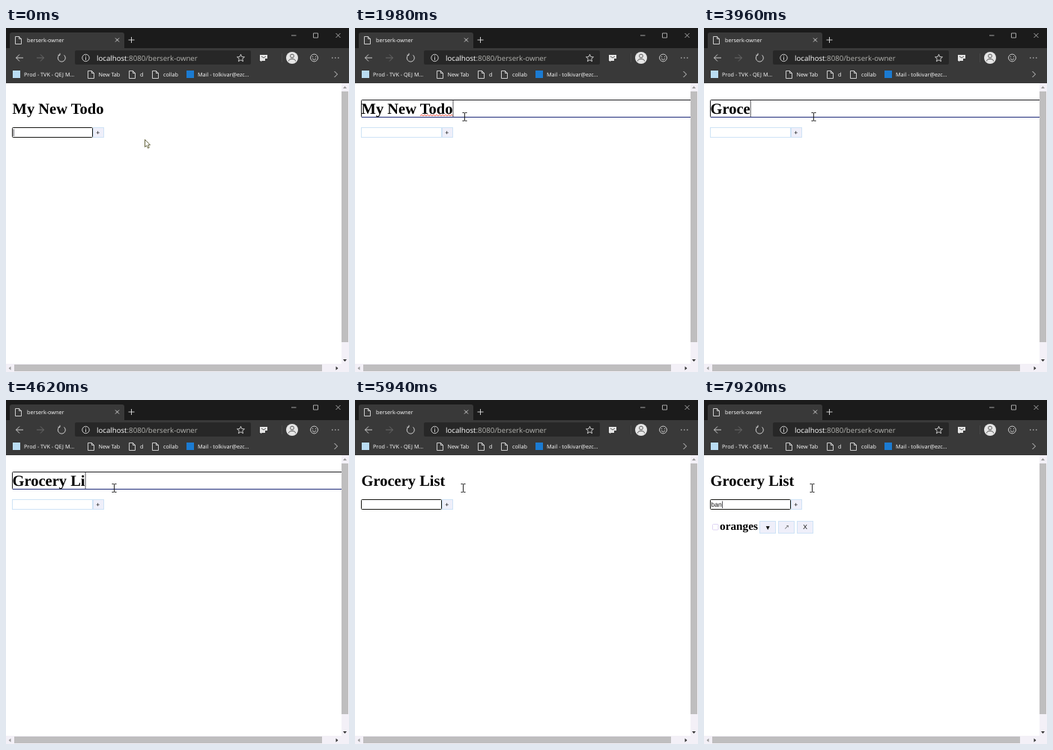
Write an HTML page that moves like this. It is 458x461 px and loops after 8000 ms.

```html
<!DOCTYPE html>
<html lang="en">
<head>
<meta charset="utf-8">
<title>Todo list</title>
<style>
  html, body { margin: 0; width: 100%; height: 100%; overflow: hidden; background: #fff; }
  svg { display: block; width: 458px; height: 461px; }
  text { white-space: pre; text-rendering: geometricPrecision; }
  .ui { font: 7.25px "Open Sans", "Noto Sans", sans-serif; fill: #fff; }
  .url { font-size: 9.68px; }
  .serif { font: bold 20.5px "Liberation Serif", "Times New Roman", serif; fill: #000; }
  .item { font-size: 15.3px; }
  .form { font: 8.53px "Liberation Sans", Arial, "DejaVu Sans", sans-serif; fill: #111; }
  .mid { text-anchor: middle; }
  .line { fill: none; stroke: #dcdcdc; stroke-width: .9; }
  .soft { fill: #efeffa; stroke: #cfe3f6; stroke-width: 1; }
</style>
</head>
<body>
<svg viewBox="0 0 458 461">
  <defs>
    <path id="doc" class="line" d="M.5.5h5l3 3v7h-8zM5.5.5v3h3"/>
  </defs>
  <rect width="458" height="461" fill="#fff"/>

  <g id="page">
    <g id="headingFocus">
      <rect x="8.5" y="96.5" width="460" height="23" rx="1" fill="none" stroke="#1c1c20"/>
      <path d="M9 119.5H448" stroke="#1d2a78"/>
    </g>
    <rect id="selection" x="9" y="97" height="22" fill="#3395fb"/>
    <text id="heading" class="serif" x="8.6" y="115"></text>
    <path id="squiggle" fill="none" stroke-width=".9"/>

    <rect id="inputBlur" class="soft" x="8.5" y="133.5" width="107" height="13" style="fill:#fff"/>
    <rect id="inputFocus" x="8.5" y="133.5" width="107" height="13" rx="1" fill="#fff" stroke="#181814"/>
    <rect class="soft" x="116.5" y="133.5" width="14" height="13"/>
    <text class="form mid" x="122.8" y="142.8">+</text>
    <text id="input" class="form" x="9.6" y="143"></text>

    <g id="item">
      <rect class="soft" x="11.5" y="166.5" width="7.5" height="7.5" rx="1" style="fill:#fff;stroke:#dfd5f4"/>
      <text class="serif item" x="21" y="174">oranges</text>
      <rect class="soft" x="74.5" y="162.5" width="21" height="16"/>
      <rect class="soft" x="99.5" y="162.5" width="21" height="16"/>
      <rect class="soft" x="124.5" y="162.5" width="21" height="16"/>
      <text class="form mid" x="85.2" y="173.6">▼</text>
      <text class="form mid" x="110.2" y="173.4" style="fill:#666">↗</text>
      <text class="form mid" x="135.2" y="173.4">X</text>
    </g>
    <rect id="caret" width="1" fill="#55555a"/>
  </g>

  <g id="scrollbars">
    <path d="M448 74h10v387H0v-11h448z" fill="#f3f0f7"/>
    <path d="M448 85h9v336h-9zM11 451h411v9H11z" fill="#bfbebf"/>
    <path d="M450 81l2.5-3 2.5 3zM6.5 453.5l-3 2.5 3 2.5z" fill="#999"/>
    <path d="M450 444l2.5 3 2.5-3zM440.5 453.5l3 2.5-3 2.5z" fill="#333"/>
  </g>

  <g id="browser">
    <rect width="458" height="28" fill="#1b1b1b"/>
    <path d="M0 27H458V74H0z" fill="#393939"/>
    <path d="M5 28V9q0-3 3-3H155q3 0 3 3V28z" fill="#393939"/>
    <use href="#doc" x="12" y="11"/>
    <text class="ui" x="28" y="19">berserk-owner</text>
    <path class="line" d="M146 13.5l5 5m0-5l-5 5M163.5 16h8m-4-4v8"/>
    <path class="line" d="M381 10h6.5M410.5 7h6v6h-6zM440.5 7l6 6m0-6l-6 6" style="stroke:#b4b4b4"/>

    <path class="line" d="M23 40H13.5m4.5-4.5L13.5 40l4.5 4.5"/>
    <path class="line" d="M41 40h9.5m-4.5-4.5L50.5 40 46 44.5" style="stroke:#707070"/>
    <path class="line" d="M77.5 36.3A5 5 0 1 1 72 35.7M72 33.8v2.5h-2.5"/>
    <rect x="92" y="30" width="235" height="19" rx="2" fill="#272727"/>
    <circle class="line" cx="106.5" cy="40" r="4.7"/>
    <path class="line" d="M106.5 39v4M106.5 37v1"/>
    <text class="ui url" x="121" y="43.6">localhost<tspan fill="#b4b4b0">:8080/berserk-owner</tspan></text>
    <path id="star" class="line"/>
    <path d="M339 36h10v5h-3v3h-4l-2 1v-1h-1z" fill="#e6e6e6"/>
    <path d="M341 38l3 2 3-2" fill="none" stroke="#555"/>
    <path d="M368.5 34v12" stroke="#484848"/>
    <circle cx="382" cy="40" r="8" fill="#e6e6e6"/>
    <circle cx="382" cy="37.5" r="2.4" fill="none" stroke="#555"/>
    <path d="M377.5 44.5q0-3 4.5-3t4.5 3" fill="none" stroke="#555"/>
    <circle class="line" cx="411.5" cy="40" r="4.9"/>
    <path class="line" d="M409 41.2q2.5 3 5 0M409.5 38v1.2M413.5 38v1.2"/>
    <path d="M435 40h1.5m2.5 0h1.5m2.5 0h1.5" stroke="#ddd" stroke-width="1.2"/>

    <rect x="9" y="57" width="10" height="10" fill="#b9dcf2"/>
    <use href="#doc" x="109" y="57"/>
    <use href="#doc" x="164" y="57"/>
    <use href="#doc" x="195" y="57"/>
    <rect x="241" y="57" width="10" height="10" fill="#1b7bd2"/>
    <g class="ui">
      <text x="24" y="65">Prod - TVK - QEJ M...</text>
      <text x="123.5" y="65">New Tab</text>
      <text x="179" y="65">d</text>
      <text x="210" y="65">collab</text>
      <text x="256" y="65">Mail - tolkivar@ezc...</text>
    </g>
    <path class="line" d="M438.5 58l4 4-4 4"/>
  </g>

  <path id="arrow" d="M0 0v10l2.3-2 1.7 3.6 1.7-.8L4.1 7.3H7z" fill="#fff" stroke="#55552a" stroke-width=".9"/>
  <path id="beam" d="M-3-5.5h2q1 0 1 1 0-1 1-1h2M-3 5.5h2q1 0 1-1 0 1 1 1h2M0-5v10" fill="none" stroke="#222"/>
</svg>
<script>
const STEP = 330, LOOP = 8000, BLINK = 530;
const $ = id => document.getElementById(id);

// Each row: start step, then the value that holds from there on.
const EDITS = [
  [0,  { title: 'My New Todo', focus: 'input', entry: '' }],
  [6,  { title: 'My New Todo', focus: 'heading', entry: '', misspelt: true }],
  [8,  { title: 'My New Todo', focus: 'heading', entry: '', misspelt: true, selected: true }],
  [10, { title: 'G', focus: 'heading', entry: '' }],
  [11, { title: 'Gro', focus: 'heading', entry: '' }],
  [12, { title: 'Groce', focus: 'heading', entry: '' }],
  [13, { title: 'Grocery', focus: 'heading', entry: '' }],
  [14, { title: 'Grocery Li', focus: 'heading', entry: '' }],
  [15, { title: 'Grocery List', focus: 'heading', entry: '' }],
  [16, { title: 'Grocery List', focus: 'input', entry: '' }],
  [19, { title: 'Grocery List', focus: 'input', entry: 'oran' }],
  [20, { title: 'Grocery List', focus: 'input', entry: 'oranges' }],
  [21, { title: 'Grocery List', focus: 'input', entry: 'b', added: true }],
  [23, { title: 'Grocery List', focus: 'input', entry: 'ba', added: true }],
  [24, { title: 'Grocery List', focus: 'input', entry: 'ban', added: true }]
];
const POINTER = [
  [0,  { shape: 'arrow', x: 185.5, y: 149.5 }],
  [1,  { shape: 'arrow', x: 178.5, y: 142.5 }],
  [2,  { shape: 'beam', x: 147.5, y: 122.5 }],
  [3,  { shape: 'beam', x: 146.5, y: 119 }],
  [13, { shape: 'beam', x: 144.5, y: 118 }]
];

const at = (rows, step) => rows.filter(row => row[0] <= step).pop();
const show = (id, on) => $(id).setAttribute('visibility', on ? 'visible' : 'hidden');
const set = (id, attrs) => Object.entries(attrs).forEach(([k, v]) => $(id).setAttribute(k, v));
const widthOf = id => $(id).textContent ? $(id).getComputedTextLength() : 0;

function wave(from, to, y) {
  let d = `M${from} ${y}`;
  for (let x = from, up = true; x < to; x += 2, up = !up) d += `l2 ${up ? -1.3 : 1.3}`;
  return d;
}

function starPath(cx, cy, r) {
  const points = Array.from({ length: 10 }, (_, i) => {
    const a = i * Math.PI / 5 - Math.PI / 2, d = i % 2 ? r * .45 : r;
    return [cx + d * Math.cos(a), cy + d * Math.sin(a)].map(n => n.toFixed(2)).join(' ');
  });
  return `M${points.join('L')}z`;
}

set('star', { d: starPath(313.5, 40.5, 5.2) });
set('squiggle', { d: wave(87, 131, 117.6) });

function render(step) {
  const [start, edit] = at(EDITS, step);
  const [, pointer] = at(POINTER, step);
  const onHeading = edit.focus === 'heading';

  $('heading').textContent = edit.title;
  $('heading').style.fill = edit.selected ? '#fff' : '#000';
  $('input').textContent = edit.entry;
  show('headingFocus', onHeading);
  show('inputFocus', !onHeading);
  show('inputBlur', onHeading);
  show('selection', edit.selected);
  show('squiggle', edit.misspelt);
  show('item', edit.added);
  set('selection', { width: widthOf('heading') });
  set('squiggle', { stroke: edit.selected ? '#7a4bb0' : '#e2382c' });

  const blinkOn = (step - start) * STEP % (2 * BLINK) < BLINK;
  show('caret', blinkOn && !edit.selected);
  set('caret', onHeading
    ? { x: 8.6 + widthOf('heading'), y: 97, height: 22 }
    : { x: 9.8 + widthOf('input'), y: 135.5, height: 9.5 });

  for (const shape of ['arrow', 'beam']) show(shape, pointer.shape === shape);
  set(pointer.shape, { transform: `translate(${pointer.x} ${pointer.y})` });
}

const begin = performance.now();
let shown = -1;
function tick() {
  const step = Math.floor((performance.now() - begin) % LOOP / STEP);
  if (step !== shown) render(shown = step);
  requestAnimationFrame(tick);
}
tick();
</script>
</body>
</html>
```
